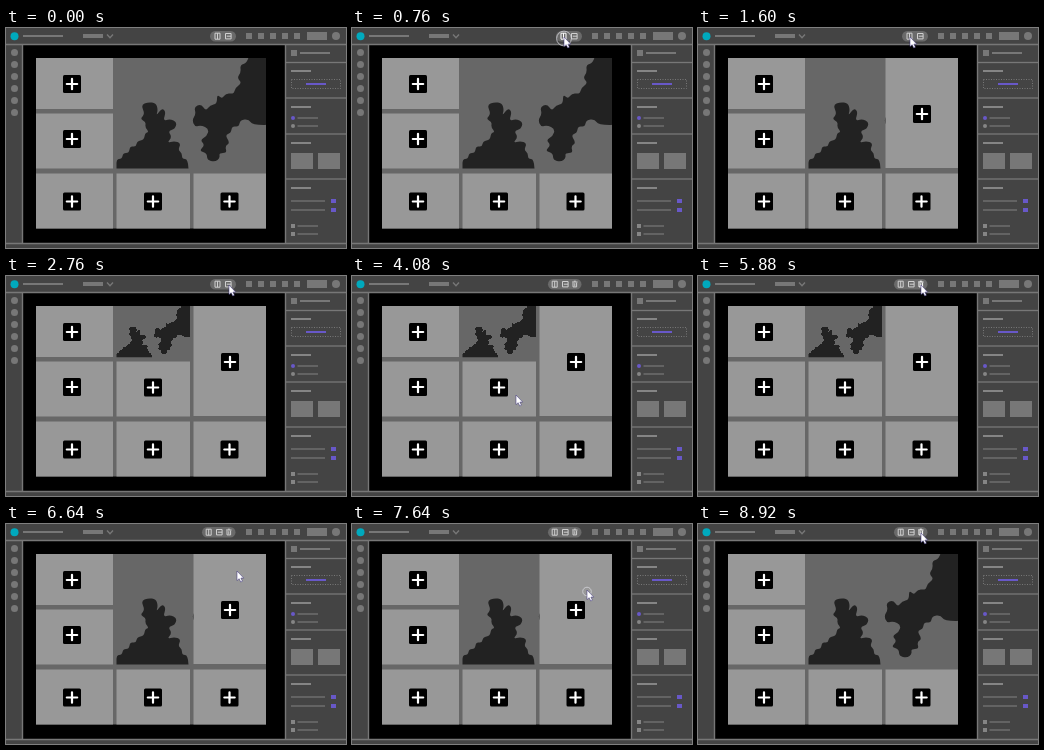
An HTML page for the animation above (9600 ms loop, 340 by 220 pixels).

```html
<!DOCTYPE html>
<html lang="en">
<head>
<meta charset="utf-8">
<title>Splitting and deleting layout cells</title>
<style>
html, body { margin: 0; width: 100%; height: 100%; overflow: hidden; background: #444; }
svg { display: block; width: 340px; height: 220px; }
.rule { stroke: #777; stroke-width: 1.4; fill: none; }
.grey { fill: #777; }
.light { fill: #858585; }
.violet { fill: #6858c8; }
.cell { fill: #989898; }
.icon { stroke: #d0d0d0; stroke-width: 1; fill: none; }
.icon.hover { stroke: #fff; }
</style>
</head>
<body>
<svg viewBox="0 0 340 220">
  <defs>
    <clipPath id="mapArea"><rect x="110.5" y="30" width="149.5" height="110.5"/></clipPath>
    <g id="map" clip-path="url(#mapArea)" fill="#222"><path id="west"/><path id="east"/></g>
    <g id="plus">
      <rect x="-9" y="-9" width="18" height="18" rx="1.5"/>
      <path d="M-5.2 0H5.2M0-5.2V5.2" stroke="#fff" stroke-width="2.2" stroke-linecap="round"/>
    </g>
  </defs>

  <rect width="340" height="220" fill="#444"/>
  <rect x="17" y="17" width="262" height="198" fill="#000"/>
  <path class="rule" d="M0 16.5H340M16.5 17V215M279.5 17V215M0 215.5H340"/>
  <g id="chrome"></g>
  <path class="rule" d="M101 6.5L104 9.8L107 6.5"/>
  <rect x="285.5" y="51.5" width="49" height="9" fill="none" stroke="#858585" stroke-dasharray="1 1.5" stroke-width=".8"/>

  <rect x="30" y="30" width="230" height="170.5" fill="#676767"/>
  <use id="fullMap" href="#map"/>
  <use id="smallMap" href="#map" transform="translate(110.5 30) scale(.4916 .4638) translate(-110.5 -30)" shape-rendering="crispEdges"/>
  <g id="cells"></g>

  <g id="pill2">
    <rect x="204" y="3" width="26" height="10.5" rx="5.2" fill="#6a6a6a"/>
    <g class="icon" transform="translate(211.5 8.2)" id="columns"><path d="M-2.5-3H2.5V3H-2.5ZM0-3V3"/></g>
    <g class="icon" transform="translate(222.3 8.2)" id="rows"><path d="M-2.8-2.7H2.8V2.7H-2.8ZM-1.5 0H2.8"/></g>
  </g>
  <g id="pill3">
    <rect x="196" y="3" width="33.5" height="10.5" rx="5.2" fill="#6a6a6a"/>
    <g class="icon" transform="translate(202.7 8.2)"><path d="M-2.5-3H2.5V3H-2.5ZM0-3V3"/></g>
    <g class="icon" transform="translate(213.3 8.2)"><path d="M-2.8-2.7H2.8V2.7H-2.8ZM-1.5 0H2.8"/></g>
    <g class="icon" transform="translate(222.8 8.2)" id="trash"><path d="M-2.7-2.2H2.7M-1-3H1M-1.8-1.5V2.7H1.8V-1.5M0-1V2.2"/></g>
  </g>

  <circle id="ring" fill="none" stroke="#d6d6dc" stroke-width=".8"/>
  <path id="cursor" d="M0 0V9.6L2.2 7.7L3.7 11L5.4 10.2L3.9 7.1H6.7Z" fill="#fff" stroke="#352b78" stroke-width=".5"/>
</svg>
<script>
const LOOP = 9600, STEP = 40;
const $ = id => document.getElementById(id);

function add(parent, tag, attrs) {
  const el = document.createElementNS('http://www.w3.org/2000/svg', tag);
  for (const key in attrs) el.setAttribute(key, attrs[key]);
  return parent.appendChild(el);
}
const chrome = $('chrome');
const box = (x, y, width, height, cls = 'grey') =>
  add(chrome, 'rect', { x, y, width, height, class: cls });
const dot = (cx, cy, r, cls = 'grey') => add(chrome, 'circle', { cx, cy, r, class: cls });
const bar = (x, y, width, height = 1.6, cls) => box(x, y - height / 2, width, height, cls);

function cell(x, y, width, height, px, py) {
  const g = add($('cells'), 'g', {});
  add(g, 'rect', { x, y, width, height, class: 'cell' });
  add(g, 'use', { href: '#plus', x: px, y: py });
  return g;
}

// Closed curve through the midpoints of a polygon's sides
function blob(points) {
  const p = points.split(' ').map(s => s.split(',').map(Number));
  const mid = i => {
    const a = p[i % p.length], b = p[(i + 1) % p.length];
    return `${(a[0] + b[0]) / 2} ${(a[1] + b[1]) / 2}`;
  };
  return 'M' + mid(p.length - 1) + p.map((q, i) => `Q${q[0]} ${q[1]} ${mid(i)}`).join('') + 'Z';
}
$('west').setAttribute('d', blob('108,150 110,131 116,131 117,125 123,125 124,118 130,119 131,113 138,112 139,105 143,104 139,99 140,94 134,91 139,86 135,77 142,74 150,75 152,82 150,88 156,80 160,84 157,93 164,91 171,94 169,101 162,103 166,109 161,115 168,113 175,115 172,122 176,125 176,131 182,131 183,150'));
$('east').setAttribute('d', blob('244,24 241,35 234,37 235,44 231,50 236,55 229,60 228,66 220,65 216,71 211,66 211,76 204,77 200,83 195,76 188,79 190,86 186,92 189,99 195,97 203,101 201,108 194,112 199,117 193,123 201,125 201,132 209,134 214,130 213,125 221,125 219,118 224,115 219,107 225,105 226,98 233,99 234,92 243,91 246,97 270,97 270,24'));

// Top bar
dot(8.5, 8.2, 4).style.fill = '#00a9bd';
bar(17, 8, 40, 2);
bar(77, 8, 20, 4);
for (let i = 0; i < 5; i++) box(240 + 12 * i, 5, 6, 6);
box(301, 4, 20, 8);
dot(330, 8, 4);

// Left bar
for (let i = 0; i < 6; i++) dot(8.5, 24.5 + 12 * i, 3.5);

// Right panel
box(285, 22, 6, 6);
bar(294, 25, 30, 2);
for (const y of [34.5, 70, 106, 151]) bar(280, y, 60, 1.3);
for (const y of [43, 79, 115, 160]) bar(285, y, 20, 2, 'light');
bar(300, 56, 20, 2, 'violet');
dot(287, 90, 2, 'violet');
dot(287, 98, 2, 'light');
for (const y of [90, 98, 198, 206]) bar(291.5, y, 20.5, 1.2);
for (const x of [285, 312]) box(x, 125, 22, 16);
for (const y of [173, 182]) {
  bar(285, y, 34, 1.2);
  bar(325, y, 5, 4, 'violet');
}
for (const y of [198, 206]) bar(285, y, 4, 4, 'light');

cell(30, 30, 77, 51, 66, 56);
cell(30, 85.5, 77, 55, 66, 111);
cell(30, 145.5, 77, 55, 66, 173.5);
cell(110.5, 145.5, 73.5, 55, 147, 173.5);
cell(187.5, 145.5, 72.5, 55, 223.5, 173.5);
const rightCell = cell(187.5, 30, 72.5, 110, 224, 86);
const lowerCell = cell(110.5, 85.5, 73.5, 55, 147, 111.5);

// Cursor stops: time, x, y
const stops = [
  [40, 143, 84], [400, 212, 9], [1600, 212, 9], [1800, 223, 9],
  [2760, 223, 9], [3360, 164, 119], [4560, 164, 119], [5160, 223, 9],
  [6400, 223, 9], [6760, 235, 66], [7680, 235, 66], [8160, 223, 9], [LOOP, 223, 9]
];
const clicks = [440, 1800, 3560, 5360, 7160, 8360];
const CLICK = 520;

function cursorAt(t) {
  const i = Math.max(1, stops.findIndex(s => s[0] >= t));
  const [t0, x0, y0] = stops[i - 1], [t1, x1, y1] = stops[i];
  const k = Math.max(0, (t - t0) / (t1 - t0));
  return [x0 + (x1 - x0) * k, y0 + (y1 - y0) * k];
}
const show = (el, on) => el.setAttribute('visibility', on ? 'visible' : 'hidden');

function draw(t) {
  const within = (a, b) => t >= a && t < b;
  const split = within(2320, 5920), three = t >= 4080;
  show(rightCell, within(1040, 8920));
  show(lowerCell, split);
  show($('smallMap'), split);
  show($('fullMap'), !split);
  show($('pill2'), !three);
  show($('pill3'), three);
  $('columns').classList.toggle('hover', within(400, 1600));
  $('rows').classList.toggle('hover', within(1800, 2760));
  $('trash').classList.toggle('hover', within(5160, 6400) || t >= 8160);

  const [x, y] = cursorAt(t);
  show($('cursor'), t >= 40);
  $('cursor').setAttribute('transform', `translate(${x} ${y})`);

  const start = clicks.find(c => within(c, c + CLICK));
  const ring = $('ring');
  show(ring, start !== undefined);
  if (start !== undefined) {
    ring.setAttribute('cx', x);
    ring.setAttribute('cy', y + 1.5);
    ring.setAttribute('r', 7.6 * Math.sin(Math.PI * (t - start) / CLICK) ** 0.4);
  }
}

const begin = performance.now();
function tick() {
  const t = (performance.now() - begin) % LOOP;
  draw(Math.floor(t / STEP) * STEP);
  requestAnimationFrame(tick);
}
tick();
</script>
</body>
</html>
```
